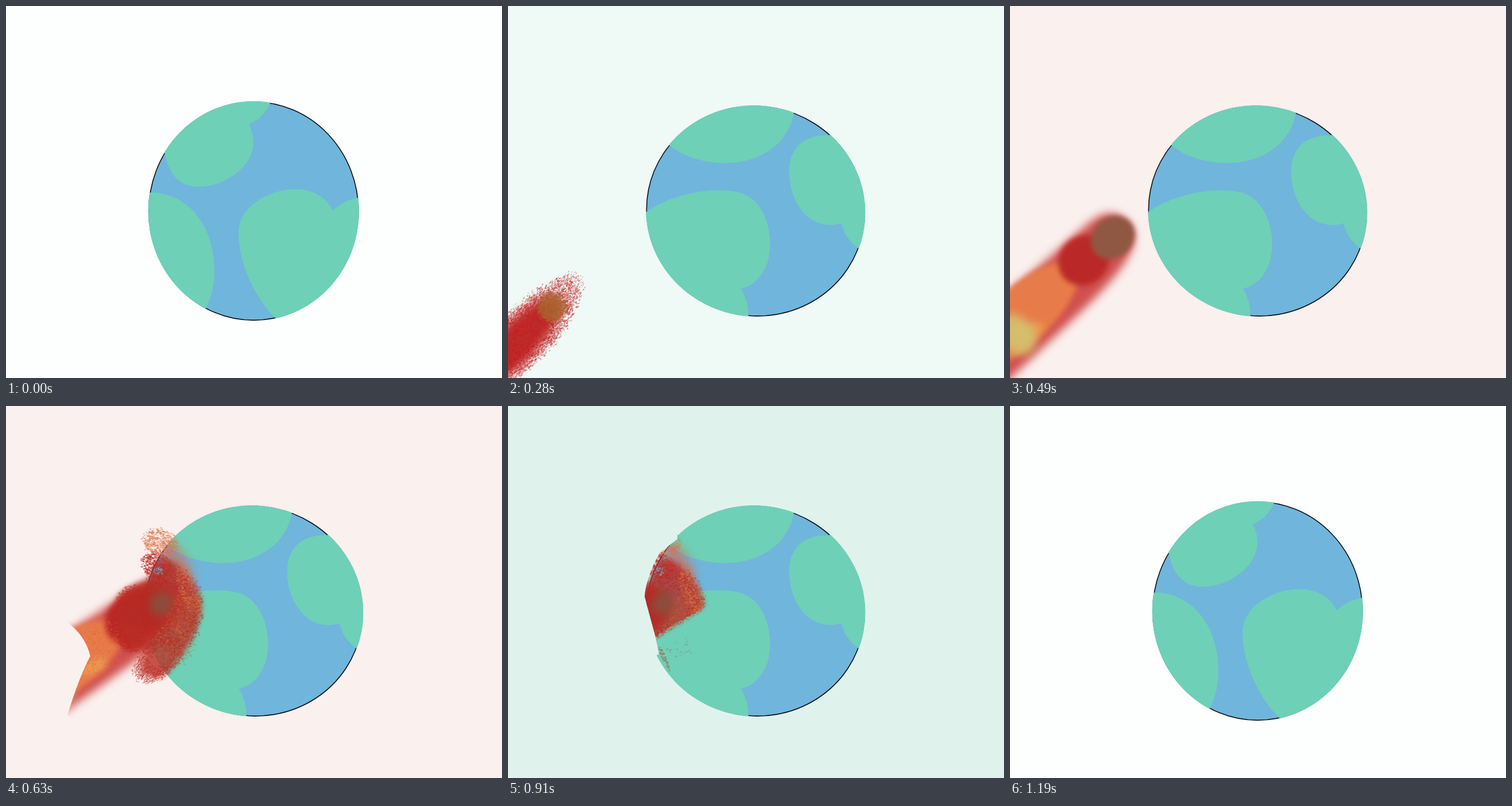
Animation, 864 px wide and 648 px high, one loop 1260 ms. Source, as an HTML page with a canvas:

```html
<!DOCTYPE html>
<html lang="en">
<head>
<meta charset="utf-8">
<title>Meteor and globe</title>
<style>
  html, body { margin: 0; width: 100%; height: 100%; overflow: hidden; background: #fdfefe; }
  canvas { display: block; }
</style>
</head>
<body>
<canvas id="stage" width="864" height="648"></canvas>
<script>
const W = 864, H = 648, STEP = 70, STEPS = 18;
const TURN = 101.2 * Math.PI / 180;
const WHITE = [253, 254, 254], MINT = [223, 243, 236], BLUSH = [250, 240, 238], ROSE = [243, 232, 230];
const ctx = document.getElementById('stage').getContext('2d');
const layer = document.createElement('canvas');
layer.width = W;
layer.height = H;
const art = layer.getContext('2d');

let seed = 1;
const rnd = () => (seed = (seed * 48271) % 2147483647) / 2147483647;
const lerp = (a, b, k) => a + (b - a) * k;
const clamp = k => Math.min(1, Math.max(0, k));
const mix = (a, b, k) => `rgb(${a.map((v, i) => Math.round(lerp(v, b[i], clamp(k))))})`;

// Continents, as seen before the globe turns.
const LAND = [
  'M277 257C283 296 306 315 336 315C382 314 431 280 431 237C431 226 428 215 423 206C438 200 452 188 460 169L466 130H200V207Z',
  'M251 325C308 324 363 372 363 463C363 485 358 508 348 527L328 570H200V316Z',
  'M613 334C597 337 582 344 569 356C558 332 533 319 505 319C460 319 405 348 405 395C405 450 436 512 470 544L482 600H680V320Z'
].map(d => new Path2D(d));
const DENT = new Path2D('M864 0H295V232L264 256Q240 300 238 332L258 406L263 432L240 446V648H864Z');
const BLOB = new Path2D('M246 304L262 270Q288 262 306 284Q336 312 341 345Q338 395 302 438Q280 472 262 474' +
  'Q234 472 234 448L246 425L208 428Q192 400 194 332Q215 312 246 304Z');

function backdrop(s) {
  if (s <= 4) return mix(WHITE, MINT, .47 * s / 4);
  if (s <= 12) return mix(BLUSH, ROSE, (s - 9) / 3);
  return mix(MINT, WHITE, (s - 13) / 3);
}

function oval(c, x, y, rx, ry, rot, color, blur = 0) {
  c.filter = blur ? `blur(${blur}px)` : 'none';
  c.fillStyle = color;
  c.beginPath();
  c.ellipse(x, y, rx, ry, rot, 0, 7);
  c.fill();
  c.filter = 'none';
}

// Chalky specks scattered over an ellipse, thinning at the rim.
function grain(c, x, y, rx, ry, rot, color, n, inner = 0) {
  c.save();
  c.translate(x, y);
  c.rotate(rot);
  c.fillStyle = color;
  for (let i = 0; i < n; i++) {
    const a = rnd() * Math.PI * 2;
    const r = (inner + (1 - inner) * Math.sqrt(rnd())) * (.85 + .25 * rnd());
    c.fillRect(Math.cos(a) * r * rx, Math.sin(a) * r * ry, 1 + rnd() * 3, .8 + rnd() * 1.4);
  }
  c.restore();
}

function globe(s) {
  const flat = s === 6;
  ctx.save();
  if (s >= 12 && s < 17) ctx.clip(DENT);
  ctx.translate(431.3, 357.2);
  if (s < 17) ctx.rotate(TURN * clamp(s / 4));
  ctx.translate(-431.3, -357.2);
  oval(ctx, 431.3, 357.2, 182.6, 190.2, 0, flat ? '#6cc1c9' : '#70b5dc');
  ctx.lineWidth = 1.6;
  ctx.strokeStyle = '#0b0f12';
  ctx.stroke();
  ctx.beginPath();
  ctx.ellipse(431.3, 357.2, 183.8, 191.4, 0, 0, 7);
  ctx.clip();
  ctx.fillStyle = flat ? '#6cc1c9' : '#6ed0b7';
  LAND.forEach(p => ctx.fill(p));
  ctx.restore();
}

function chalkMeteor(x, y) {
  const tilt = -.82;
  ctx.save();
  ctx.translate(x - 78, y - 525);
  oval(ctx, 20, 582, 98, 34, tilt, '#c02a29', 8);
  grain(ctx, 31, 572, 120, 47, tilt, 'rgba(194,42,42,.5)', 3600, .2);
  grain(ctx, 92, 506, 48, 29, tilt, 'rgba(200,70,70,.4)', 650);
  grain(ctx, 18, 580, 92, 38, tilt, 'rgba(190,30,30,.5)', 800);
  oval(ctx, 76, 525, 22, 22, 0, 'rgba(168,102,48,.75)', 4);
  grain(ctx, 76, 525, 28, 27, tilt, 'rgba(168,106,48,.6)', 450);
  ctx.restore();
}

function comet(x, y, heading, len, whole) {
  const t = -156 - len;
  ctx.save();
  ctx.translate(x, y);
  ctx.rotate(heading);
  ctx.beginPath();
  ctx.moveTo(90, -120);
  ctx.lineTo(t, -120);
  ctx.lineTo(t, -68);
  ctx.quadraticCurveTo(t + 14, -30, t, 5);
  ctx.quadraticCurveTo(t - 40, 26, t - 91, 66);
  ctx.lineTo(t - 91, 130);
  ctx.lineTo(90, 130);
  ctx.clip();
  ctx.filter = 'blur(8px)';
  ctx.fillStyle = 'rgba(200,52,50,.85)';
  ctx.beginPath();
  ctx.moveTo(38, 0);
  ctx.bezierCurveTo(38, -38, 10, -46, -14, -47);
  ctx.lineTo(-430, -58);
  ctx.lineTo(-430, 60);
  ctx.lineTo(-150, 58);
  ctx.bezierCurveTo(-80, 57, 38, 57, 38, 0);
  ctx.fill();
  oval(ctx, -212, -8, 130, 50, 0, '#e77c4a', 5);
  oval(ctx, -165 - len * .45, 22, 28, 14, .3, 'rgba(238,170,88,.6)', 6);
  oval(ctx, -238, 10, 30, 40, 0, 'rgba(212,194,112,.9)', 8);
  oval(ctx, -64, -5, 46, 42, 0, '#ba2927', 5);
  if (whole) oval(ctx, 0, 0, 41, 35, 0, '#8f5843', 4);
  else grain(ctx, -150, 0, 60, 45, 0, 'rgba(224,104,60,.4)', 700);
  ctx.restore();
}

// Wipes the splash below a line that swings up around the dent's lower corner.
function wipe(s) {
  art.save();
  art.translate(258, 406);
  art.rotate(.1 - .65 * Math.sqrt(s - 12));
  art.filter = 'blur(2px)';
  art.fillStyle = '#000';
  art.fillRect(-400, 0, 900, 500);
  art.filter = 'none';
  grain(art, 45, 0, 70, 6, 0, 'rgba(0,0,0,.6)', 350);
  art.restore();
}

function splash(s) {
  art.clearRect(0, 0, W, H);
  grain(art, 268, 237, 31, 24, .3, 'rgba(222,124,84,.6)', 620);
  grain(art, 262, 276, 28, 22, .4, 'rgba(184,48,46,.65)', 600);
  oval(art, 299, 276, 18, 42, -.5, 'rgba(205,110,84,.65)', 9);
  art.filter = 'blur(5px)';
  art.fillStyle = 'rgba(186,48,40,.82)';
  art.fill(BLOB);
  art.filter = 'none';
  oval(art, 240, 353, 45, 37, -.4, '#b62b25', 8);
  grain(art, 287, 352, 54, 72, -.1, 'rgba(182,44,36,.5)', 1500, .3);
  grain(art, 218, 370, 31, 58, 0, 'rgba(186,42,34,.5)', 800, .4);
  grain(art, 265, 440, 52, 31, -.75, 'rgba(186,52,44,.5)', 1000, .3);
  grain(art, 317, 318, 18, 48, -.3, 'rgba(222,122,72,.45)', 450);
  grain(art, 309, 360, 30, 40, .2, 'rgba(214,92,50,.4)', 350);
  grain(art, 290, 415, 38, 38, 0, 'rgba(176,112,76,.45)', 420);
  oval(art, 270, 344, 19, 21, .4, 'rgba(128,88,68,.8)', 8);

  art.globalCompositeOperation = 'destination-out';
  grain(art, 263, 287, 9, 8, 0, 'rgba(0,0,0,.5)', 40);
  if (s >= 12) wipe(s);
  art.globalCompositeOperation = 'source-over';
  if (s >= 12) {
    grain(art, 271, 440, 4, 24, -.4, 'rgba(150,120,90,.6)', 70);
    grain(art, 300, 420, 28, 16, 0, 'rgba(150,130,95,.5)', 24);
  }

  ctx.save();
  if (s >= 12) ctx.clip(DENT);
  ctx.drawImage(layer, 0, 0);
  ctx.restore();
}

function draw(s) {
  seed = 4711;
  ctx.fillStyle = backdrop(s);
  ctx.fillRect(0, 0, W, H);
  globe(s);

  // Flight curves towards the globe; the tail is used up after the hit.
  const k = (s - 4) / 5, f = Math.min(1, k);
  const x = 78 + 129 * f + 65 * f * f;
  const y = 525 - 232 * f + 49 * f * f;
  if (s === 3 || s === 4) chalkMeteor(x, y);
  else if (s > 4 && s < 12) comet(x, y, lerp(-.95, -.61, f), 150 * (1 - k ** 3), s < 9);
  if (s >= 9 && s < 17) splash(s);
}

let shown = -1;
function tick() {
  const s = Math.floor(performance.now() / STEP) % STEPS;
  if (s !== shown) draw(shown = s);
  requestAnimationFrame(tick);
}
tick();
</script>
</body>
</html>
```
